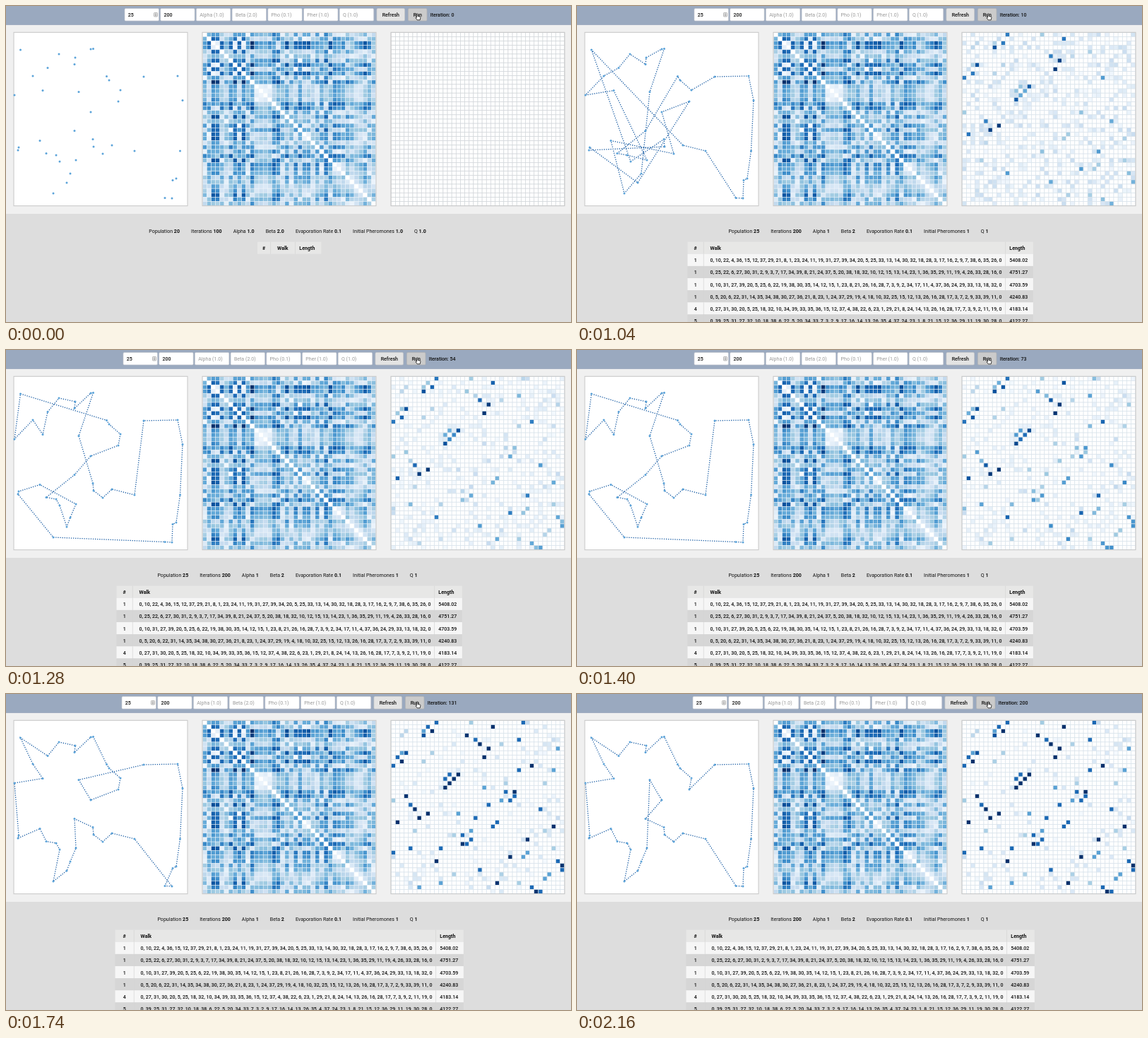
Recreate the animation shown at these times as an HTML page. Size 800 px wide and 447 px high, loop 2660 ms.

```html
<!DOCTYPE html>
<html lang="en">
<head>
<meta charset="utf-8">
<title>Ant colony walk</title>
<style>
html, body { margin: 0; width: 100%; height: 100%; overflow: hidden; background: #ddd; }
svg { display: block; width: 100vw; height: 100vh; }
text { font-family: Roboto, "Open Sans", sans-serif; font-size: 8px; fill: #111; }
.b { font-weight: 700; }
.m { font-weight: 500; letter-spacing: -.005em; }
.hint { fill: #999; }
</style>
</head>
<body>
<svg id="stage" viewBox="0 0 800 447" preserveAspectRatio="none"></svg>
<script>
const NS = 'http://www.w3.org/2000/svg';
const LOOP = 2660, START = 1000, STEP = 20, END = 2160;
const N = 40, TOP = 37.3, SIZE = 245.4, CELL = SIZE / N;
const NARROW = 0.885;
const svg = document.getElementById('stage');

function el(name, attrs, parent = svg) {
  const node = document.createElementNS(NS, name);
  for (const k in attrs) node.setAttribute(k, attrs[k]);
  parent.appendChild(node);
  return node;
}
function rect(x, y, width, height, fill, more, parent) {
  return el('rect', { x, y, width, height, fill, ...more }, parent);
}
const place = (node, x, y) => node.setAttribute('transform', `translate(${x} ${y}) scale(${NARROW} 1)`);
function label(str, x, y, cls = '', parent, anchor = 'start') {
  const node = el('text', { class: cls, 'text-anchor': anchor }, parent);
  node.textContent = str;
  place(node, x, y);
  return node;
}
const show = (node, on) => node.setAttribute('display', on ? 'inline' : 'none');

// Cities along the last tour: index x y
const route = `0 76 220, 30 67 265, 31 86 250, 27 91 237, 18 99 218, 36 103 121.5, 35 120 150, 25 97 176.5,
5 123 188.5, 20 124 199, 34 137 209, 39 150 197, 33 182 205, 9 225 271.5, 2 235 272, 7 236 246.5, 3 241 244,
17 246.5 205, 28 250 133.5, 16 243 99, 26 195 100, 14 159 135, 13 162 119, 12 146 105, 15 142.5 99.5,
21 123.5 60.5, 8 120 61, 1 97 82.5, 23 98 73, 24 75 68, 37 59 87.5, 11 20.5 62, 29 38 99, 4 52 119.5,
19 12 126, 22 18 200, 6 17 204, 38 48 190.5, 32 57 208.5, 10 71 211`
  .split(',').map(s => s.trim().split(' ').map(Number)).map(([id, x, y]) => ({ id, x, y }));
const city = [];
route.forEach(c => city[c.id] = c);
const dist = (a, b) => Math.hypot(a.x - b.x, a.y - b.y);

const walks = [
  [1, '0, 10, 22, 4, 36, 15, 12, 37, 29, 21, 8, 1, 23, 24, 11, 19, 31, 27, 39, 34, 20, 5, 25, 33, 13, 14, 30, 32, 18, 28, 3, 17, 16, 2, 9, 7, 38, 6, 35, 26, 0', '5408.02'],
  [1, '0, 25, 22, 6, 27, 30, 31, 2, 9, 3, 7, 17, 34, 39, 8, 21, 24, 37, 5, 20, 38, 18, 32, 10, 12, 15, 13, 14, 23, 1, 36, 35, 29, 11, 19, 4, 26, 33, 28, 16, 0', '4751.27'],
  [1, '0, 10, 31, 27, 39, 20, 5, 25, 6, 22, 19, 38, 30, 35, 14, 12, 15, 1, 23, 8, 21, 26, 16, 28, 7, 3, 9, 2, 34, 17, 11, 4, 37, 36, 24, 29, 33, 13, 18, 32, 0', '4703.59'],
  [1, '0, 5, 20, 6, 22, 31, 14, 35, 34, 38, 30, 27, 36, 21, 8, 23, 1, 24, 37, 29, 19, 4, 18, 10, 32, 25, 15, 12, 13, 26, 16, 28, 17, 3, 7, 2, 9, 33, 39, 11, 0', '4240.83'],
  [4, '0, 27, 31, 30, 20, 5, 25, 18, 32, 10, 34, 39, 33, 35, 36, 15, 12, 37, 4, 38, 22, 6, 23, 1, 29, 21, 8, 24, 14, 13, 26, 16, 28, 17, 7, 3, 9, 2, 11, 19, 0', '4183.14'],
  [5, '0, 39, 25, 31, 27, 32, 10, 18, 38, 6, 22, 5, 20, 34, 33, 7, 3, 2, 9, 17, 16, 14, 13, 26, 35, 4, 37, 24, 23, 1, 8, 21, 15, 12, 36, 29, 11, 19, 30, 28, 0', '4122.27']
];

// Earlier tours visit runs of the last one in another order or direction
function runs(s) {
  return s.split(' ').flatMap(part => {
    const [a, b = a] = part.split('-').map(Number);
    return Array.from({ length: Math.abs(b - a) + 1 }, (_, n) => route[a + n * Math.sign(b - a)]);
  });
}
const tours = [
  walks[3][1].split(', ').slice(0, N).map(id => city[id]),
  runs('0 1 3 2 10 39-37 33-36 5 31 32 30 29 26 25 23 24 28 27 6 9 8 21 22 20 17-13 19 18 12 11 7 4'),
  runs('0 2-4 37 35 36 1 13-20 12-8 5 25-30 33 32 34 31 24-21 6 7 38 39'),
  runs('0-4 7 5 6 8-12 15 13 14 16-39'),
  runs('0-4 7-12 14 13 15-20 5 6 21-39'),
  route
];
const pace = [[1000, 2], [1120, 25], [1280, 54], [1540, 96], [1740, 131], [2160, 200]];

// Time to iteration count and tour
function progress(t) {
  const n = Math.max(1, pace.findIndex(p => t <= p[0]));
  const [t0, a] = pace[n - 1], [t1, b] = pace[n], f = (t - t0) / (t1 - t0);
  return { iter: Math.round(a + (b - a) * f), tour: tours[f < .5 ? n - 1 : n] };
}

// Pheromone: an edge used by many tours grows strong, stray trails evaporate
const key = (a, b) => Math.min(a.id, b.id) * N + Math.max(a.id, b.id);
const uses = {};
tours.slice(1).forEach(tour => tour.forEach((c, n) => {
  const k = key(c, tour[(n + 1) % N]);
  uses[k] = (uses[k] || 0) + 1;
}));
let seed = 7;
function random() {
  seed = (seed * 16807) % 2147483647;
  return seed / 2147483647;
}
const pairs = [];
for (let i = 0; i < N; i++) {
  for (let j = i + 1; j < N; j++) {
    const d = dist(city[i], city[j]);
    const cap = ((uses[key(city[i], city[j])] || 0) / 5) ** 1.2;
    pairs.push({ i, j, d, cap, stray: Math.max(0, random() - .7) });
  }
}
function weight(p, iter) {
  const faint = .9 * p.stray - .25 * (1 - Math.exp(-iter / 70));
  if (!p.cap) return faint;
  const x = Math.min(1, Math.max(0, (iter - 10) / 130));
  const base = Math.min(1, 1.15 * Math.exp(-p.d / 20));
  return base + Math.max(0, p.cap - base) * x * x * (3 - 2 * x);
}

// Continuous blue scale
const BLUES = [0xf7fbff, 0xdeebf7, 0xc6dbef, 0x9ecae1, 0x66abd9, 0x3e8ecb, 0x1d6bb7, 0x08509c, 0x08306b];
function shade(v) {
  const p = Math.min(.9999, Math.max(0, v)) * 8, n = Math.floor(p);
  const mix = s => {
    const a = BLUES[n] >> s & 255, b = BLUES[n + 1] >> s & 255;
    return Math.round(a + (b - a) * (p - n));
  };
  return `rgb(${mix(16)},${mix(8)},${mix(0)})`;
}

// Page
rect(0, 0, 800, 447, '#ddd');
rect(0, 0, 800, 294, '#f0f0f0');
rect(0, 0, 800, 26.5, '#9aa9bf');
rect(0, 26, 800, .6, '#8d9cb2');
const frame = (x, fill) => rect(x, TOP, 246, SIZE, fill, { stroke: '#c6c6c6' });

// Walk
frame(11, '#fff');
const line = el('path', { fill: 'none', stroke: '#1a5da4', 'stroke-width': 1.3, 'stroke-dasharray': '1.3 1.8' });
route.forEach(c => el('circle', { cx: c.x, cy: c.y, r: 1.5, fill: '#5ba3d9' }));

// Matrices
function matrix(x0, stroke, width) {
  const g = el('g', { stroke, 'stroke-width': width });
  g.cells = Array.from({ length: N * N }, (_, n) =>
    rect(x0 + n % N * CELL, TOP + Math.floor(n / N) * CELL, CELL, CELL, '#fff', {}, g));
  frame(x0 - .3, 'none');
  return g;
}
function setPair(g, p, fill) {
  g.cells[p.i * N + p.j].setAttribute('fill', fill);
  g.cells[p.j * N + p.i].setAttribute('fill', fill);
}
const heat = matrix(278.3, '#edf4fa', .5);
const trail = matrix(545.3, '#d2d6da', .7);
const far = Math.max(...pairs.map(p => p.d));
pairs.forEach(p => setPair(heat, p, shade(p.d / far)));

// Tool bar
const bar = el('g', {});
const box = (x, w, fill, stroke) => rect(x, 3.5, w, 17.5, fill, { rx: 1.5, stroke, 'stroke-width': .7 }, bar);
['25', '200', 'Alpha (1.0)', 'Beta (2.0)', 'Pho (0.1)', 'Pher (1.0)', 'Q (1.0)'].forEach((s, n) => {
  const x = 168 + 50.7 * n;
  box(x, 48.5, '#fff', '#c4c8ce');
  label(s, x + 4.8, 15.2, n < 2 ? 'm' : 'hint', bar);
});
rect(209.5, 9.5, 5, 5.5, '#eee', { rx: .8, stroke: '#999', 'stroke-width': .7 }, bar);
el('path', { d: 'M210.7 11.8l1.3-1.4 1.3 1.4zM210.7 12.8l1.3 1.4 1.3-1.4z', fill: '#777' }, bar);
box(525, 39.5, '#e3e3e3', '#c9c9c9');
label('Refresh', 544.8, 15.2, 'm', bar, 'middle');
box(569.5, 26.5, '#cbcbcb', '#b4b4b4');
label('Run', 582.8, 15.2, 'm', bar, 'middle');
const counter = label('', 600.7, 15, 'm', bar);
el('path', {
  d: 'M581.6 11.2q.9-.9 1.5.2v3l3.2.7q.8.3.6 1.3l-.7 3.4h-4l-2.2-3.2q0-1.1 1.6-.2z',
  fill: '#fff', stroke: '#111', 'stroke-width': .8, 'stroke-linejoin': 'round'
});

// Settings line, spread evenly about the middle
function settings(values) {
  const g = el('g', {}), gap = 16;
  const names = ['Population', 'Iterations', 'Alpha', 'Beta', 'Evaporation Rate', 'Initial Pheromones', 'Q'];
  const items = names.map((name, n) => {
    const node = label(name + ' ', 0, 0, '', g);
    el('tspan', { class: 'b' }, node).textContent = values[n];
    return { node, w: node.getComputedTextLength() * NARROW };
  });
  let x = 398.5 - (items.reduce((sum, o) => sum + o.w, 0) + gap * (items.length - 1)) / 2;
  items.forEach(o => {
    place(o.node, x, 321.3);
    x += o.w + gap;
  });
  return g;
}
const before = settings(['20', '100', '1.0', '2.0', '0.1', '1.0', '1.0']);
const after = settings(['25', '200', '1', '2', '0.1', '1', '1']);

// Tables, centred; the first column widens with the digits of its numbers
function table(digits, walkW, lenW, rows) {
  const g = el('g', {}), head = 333.7, rowH = 17.1;
  const numW = 14.3 + 4 * digits, width = numW + walkW + lenW;
  const left = 401.2 - width / 2, rule1 = left + numW, rule2 = rule1 + walkW;
  const row = (y, fill, [num, walk, len], cls) => {
    const r = el('g', {}, g);
    rect(left, y, width, rowH, fill, {}, r);
    [rule1, rule2].forEach(x => rect(x, y, .7, rowH, '#d4d4d4', {}, r));
    label(num, left + numW / 2, y + 11.5, cls, r, 'middle');
    label(walk, rule1 + 9.7, y + 11.5, cls, r);
    label(len, rule2 + 6, y + 11.5, cls, r);
    return r;
  };
  row(head, '#e7e7e6', ['#', 'Walk', 'Length'], 'b');
  g.rows = rows.map((r, n) => row(head + rowH * (n + 1), n % 2 ? '#d6d6d6' : '#f6f6f6', r, 'm'));
  return g;
}
const tables = [table(1, 35, 37, [])];
for (let d = 1; d < 4; d++) tables.push(table(d, 427.5, 39.5, walks));

let last = -1;
function draw(time) {
  const t = Math.min(END, Math.floor(time / STEP) * STEP);
  const on = t >= START, at = on ? t : 0;
  if (at === last) return;
  last = at;
  const { iter, tour } = on ? progress(t) : { iter: 0, tour: [] };
  const digits = String(iter).length;
  counter.textContent = 'Iteration: ' + iter;
  bar.setAttribute('transform', `translate(${-2 * (digits - 1)} 0)`);
  show(before, !on);
  show(after, on);
  tables.forEach((g, n) => {
    show(g, n === (on ? digits : 0));
    g.rows.forEach((r, i) => show(r, walks[i][0] <= iter));
  });
  line.setAttribute('d', on ? 'M' + tour.map(c => c.x + ' ' + c.y).join('L') + 'Z' : '');
  trail.setAttribute('stroke', on ? '#d9e3eb' : '#d2d6da');
  pairs.forEach(p => {
    const w = on ? weight(p, iter) : 0;
    const fill = w < .01 ? '#fff' : shade(w);
    if (fill !== p.fill) setPair(trail, p, p.fill = fill);
  });
}

const begin = performance.now();
function tick() {
  draw((performance.now() - begin) % LOOP);
  requestAnimationFrame(tick);
}
tick();
</script>
</body>
</html>
```
